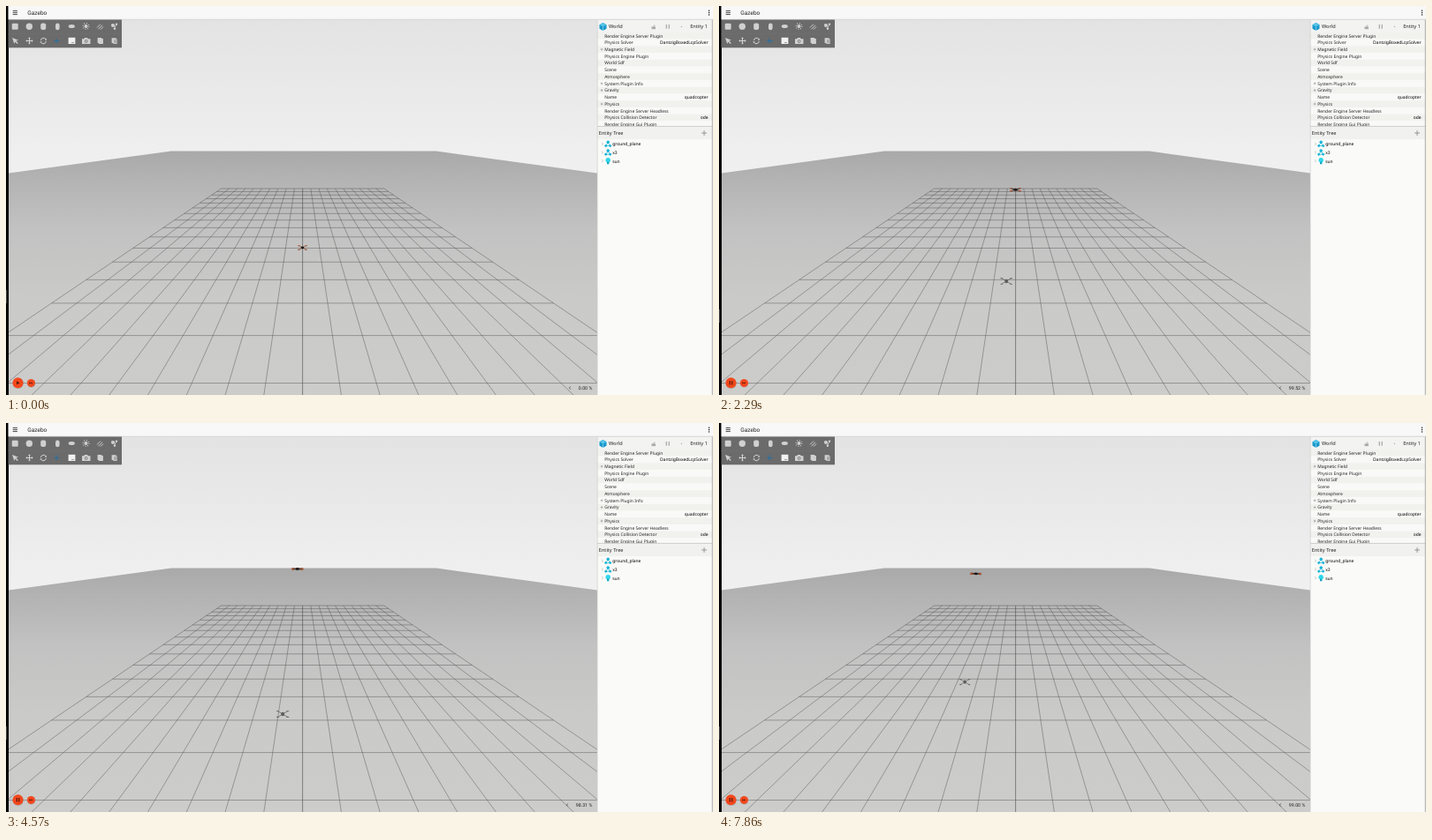
Animation, 800 px wide and 441 px high, one loop 8000 ms. Source, as an HTML page:

```html
<!DOCTYPE html>
<html lang="en">
<head>
<meta charset="utf-8">
<title>Quadcopter simulation</title>
<style>
  html, body { margin: 0; width: 100%; height: 100%; overflow: hidden; background: #000; }
  svg { display: block; width: 100%; height: 100%; }
  text { font-family: "Noto Sans", "Open Sans", sans-serif; font-size: 4.95px; fill: #222; text-rendering: geometricPrecision; }
  .title, .factor { font-family: Roboto, sans-serif; }
  .title { font-size: 6.5px; }
  .factor { font-size: 5.3px; }
  .head { font-size: 5.6px; }
  .value { fill: #000; }
  .end { text-anchor: end; }
</style>
</head>
<body>
<svg viewBox="0 0 800 441" preserveAspectRatio="none">
  <defs>
    <linearGradient id="sky" x1="0" y1="0" x2="0" y2="1">
      <stop offset="0" stop-color="#e3e3e3"/><stop offset=".85" stop-color="#efefef"/><stop offset="1" stop-color="#f0f0f0"/>
    </linearGradient>
    <linearGradient id="ground" gradientUnits="userSpaceOnUse" x1="0" y1="164" x2="0" y2="441">
      <stop offset="0" stop-color="#a9a9a9"/><stop offset=".13" stop-color="#b4b4b4"/>
      <stop offset=".32" stop-color="#c2c2c2"/><stop offset=".6" stop-color="#cacac9"/><stop offset="1" stop-color="#cccccb"/>
    </linearGradient>
    <clipPath id="view"><path d="M3 15H669V441H3z"/></clipPath>
    <clipPath id="list"><path d="M669 30H800V136H669z"/></clipPath>
    <g id="model" fill="#16b5d8" stroke="#16b5d8">
      <path d="M0-1.5L-2.4 2.2H2.4z" fill="none" stroke-width=".7"/>
      <circle cy="-2" r="1.3"/><circle cx="-2.5" cy="2.2" r="1"/><circle cx="2.5" cy="2.2" r="1"/>
    </g>
  </defs>

  <g clip-path="url(#view)">
    <rect x="3" y="15" width="666" height="180" fill="url(#sky)"/>
    <path d="M3 189.5L187 164.5H487L669 189.5V441H3z" fill="url(#ground)"/>
    <path id="grid" fill="none" stroke="#555" stroke-opacity=".72" stroke-width=".65"/>
    <path d="M335.6 207V441" stroke="#444" stroke-opacity=".4" stroke-width=".6"/>
    <g id="shadow"></g>
    <g id="drone"></g>
  </g>

  <rect x="2.5" width="797.5" height="15" fill="#f8f8f8"/>
  <path d="M2.5 15.2H800" stroke="#d0d0d0" stroke-width=".6"/>
  <path d="M7.7 5.6h5.2M7.7 7.6h5.2M7.7 9.6h5.2" stroke="#333" stroke-width=".9"/>
  <text class="title" x="24.3" y="9.8">Gazebo</text>
  <g fill="#222"><circle cx="795.5" cy="5.2" r=".8"/><circle cx="795.5" cy="7.6" r=".8"/><circle cx="795.5" cy="10" r=".8"/></g>
  <rect id="mark" x="0" width="1" height="15" fill="#444"/>

  <rect x="2.5" y="15.5" width="128.5" height="31.8" fill="#6b6b6b"/>
  <path d="M2.5 31.4H131" stroke="#737373" stroke-width=".6"/>
  <g fill="#d0d0d0" stroke="#d8d8d8" stroke-width="0">
    <rect x="6.7" y="19.7" width="7" height="7" rx="1.3"/>
    <circle cx="26.3" cy="23.2" r="3.7"/>
    <rect x="39.2" y="19.6" width="6" height="7.4" rx="2"/>
    <rect x="56" y="19.4" width="4.6" height="7.8" rx="2.3"/>
    <ellipse cx="74.3" cy="23" rx="3.6" ry="2"/>
    <circle cx="90.5" cy="23" r="2"/>
    <circle cx="90.5" cy="23" r="3.4" fill="none" stroke-width="1.2" stroke-dasharray=".9 1.77"/>
    <path d="M103 24.5l4-4M104.5 26.3l4.5-4.5M107 26.6l3-3" stroke-width=".9"/>
    <path d="M119 21l4 1.5M122 26l3-5" stroke-width=".9"/><circle cx="121" cy="22" r="2"/><circle cx="125" cy="20.6" r="1.2"/><circle cx="123" cy="25.8" r="1.2"/>
    <path d="M7 36l7 2.7-2.6.9 2.4 2.5-1 1-2.4-2.6-1 2.4z"/>
    <path d="M23 39.4h7M26.5 36v7" stroke-width="1"/>
    <path d="M22.3 39.4l1.7-1.5v3zM30.7 39.4L29 37.9v3zM26.5 35.3L25 37h3zM26.5 43.5L25 41.8h3z"/>
    <path d="M39.4 39a3.1 3.1 0 0 1 5.6-1.4M45.4 40a3.1 3.1 0 0 1-5.6 1.4" fill="none" stroke-width="1"/>
    <path d="M44 39l2-.2-.4-2.2zM40.6 40l-2 .2.4 2.2z"/>
    <path d="M54.3 39.5h6.5M57 36.8v5.4" stroke="#2c6f9e" stroke-width="1.2"/>
    <rect x="70.6" y="35.8" width="7.8" height="7.2" fill="#f1f1f1"/><path d="M74 41.5h3" stroke="#888" stroke-width=".8"/>
    <path d="M86 37.3h2.2l.8-1.3h3l.8 1.3H95.500v5.800H86z"/><circle cx="90.7" cy="40" r="1.8" fill="#6b6b6b"/><circle cx="90.7" cy="40" r="1"/>
    <path d="M103.600 36h4.600v1h1.700v6h-5v-1h-1.300z"/>
    <path d="M119.600 36.300h5v1.300h1v5.300h-4.200v-1h-1.800z"/><path d="M122 38.200h3v4h-3z" fill="#aaa"/>
  </g>

  <rect x="669" y="15.4" width="131" height="426" fill="#fafaf8"/>
  <rect x="669" y="15.4" width="131" height="14.8" fill="#f3f3f2"/>
  <g id="rows" clip-path="url(#list)"></g>
  <path d="M675.500 19l4 2.200v4.600l-4 2.200-4-2.200v-4.600z" fill="#1999cc"/>
  <path d="M675.500 19l4 2.200-4 2.200-4-2.200z" fill="#58c4e8"/><path d="M675.500 23.400V28" stroke="#d8f2fb" stroke-width=".5"/>
  <text class="head" x="682" y="25.2">World</text>
  <text class="head end" x="793.7" y="25.2">Entity 1</text>
  <g fill="#aaa">
    <path d="M730.5 23.400h4.500v2.800h-4.500z"/><path d="M733 23.400v-1.400h1.500" fill="none" stroke="#aaa" stroke-width=".7"/>
    <path d="M746.600 21h1.300v4.800h-1.300zM749.600 21h1.300v4.800h-1.300z"/><circle cx="764.4" cy="23.4" r=".7"/>
  </g>
  <rect x="669" y="136" width="131" height="15" fill="#f1f1f0"/>
  <path d="M669 136.400H800" stroke="#c4c4c4" stroke-width=".8"/>
  <text class="head" x="670.800" y="146.200">Entity Tree</text>
  <path d="M787 144h6M790 141v6" stroke="#777" stroke-width=".7"/>
  <g id="tree"></g>
  <path d="M669.200 15.500V441" stroke="#c8c8c8" stroke-width=".6"/>
  <path d="M799.300 15.500V441" stroke="#b5b5b5" stroke-width="1.2"/>

  <circle cx="13.700" cy="427.800" r="6.200" fill="#777" opacity=".35"/>
  <circle cx="13.500" cy="427.200" r="6" fill="#f2481d"/>
  <path id="play" d="M12 425.200v4l3.600-2z" fill="#57170a"/>
  <path id="pause" d="M11.700 425h1.200v4.400h-1.200zM14.200 425h1.200v4.400h-1.200z" fill="#57170a"/>
  <circle cx="28.600" cy="427.900" r="4.700" fill="#777" opacity=".35"/>
  <circle cx="28.400" cy="427.400" r="4.500" fill="#f2481d"/>
  <path d="M26.400 426.200v2.400l1.900-1.200zM28.500 426.200v2.400l1.900-1.200z" fill="#57170a"/>
  <text id="factor" class="factor end" x="663.300" y="434.900"></text>
  <path id="chevron" d="M.8-1.600L-.7 0 .8 1.600" fill="none" stroke="#333" stroke-width=".7"/>
</svg>
<script>
const LOOP = 8000, TICKS_PER_MS = 0.007;
const el = id => document.getElementById(id);
const clamp = (v, lo = 0, hi = 1) => Math.min(hi, Math.max(lo, v));

// Ground grid: 20 x 20 cells seen in perspective.
const HORIZON = 144.6, CENTER = 335.6, SPREAD = 0.1477;
const rowY = i => i < 19 ? HORIZON + 1201 / (19.245 - i) : 460;
const gridX = (j, y) => CENTER + (j - 10) * SPREAD * (y - HORIZON);
let grid = "";
for (let i = 0; i <= 20; i++) {
  const y = rowY(i);
  if (y < 441) grid += `M${gridX(0, y)} ${y}H${gridX(20, y)}`;
  grid += `M${gridX(i, rowY(0))} ${rowY(0)}L${gridX(i, 445)} 445`;
}
el("grid").setAttribute("d", grid);

// Property list; a leading + marks an expandable row.
const properties = [
  "Render Engine Server Plugin", "Physics Solver|DantzigBoxedLcpSolver", "+Magnetic Field",
  "Physics Engine Plugin", "World Sdf", "Scene", "Atmosphere", "+System Plugin Info", "+Gravity",
  "Name|quadcopter", "+Physics", "Render Engine Server Headless", "Physics Collision Detector|ode",
  "Render Engine Gui Plugin"
];
el("rows").innerHTML = properties.map((entry, i) => {
  const [label, value = ""] = entry.replace("+", "").split("|");
  const y = 33.7 + i * 7.74;
  const plus = entry[0] === "+" ? `<path d="M672.700 ${y}h2.800M674.100 ${y - 1.4}v2.800" stroke="#777" stroke-width=".5"/>` : "";
  return `<rect x="669" y="${y - 3.87}" width="130" height="7.74" fill="${i % 2 ? "#f9f9f7" : "#f1f1ee"}"/>${plus}
    <text x="677.200" y="${y + 1.8}">${label}</text><text class="value end" x="794.600" y="${y + 1.8}">${value}</text>`;
}).join("");

const bulb = `<circle cy="-1" r="2.700" fill="#2fd6ea"/><path d="M-1.200 1h2.400v2.600h-2.400z" fill="#16a9c4"/>`;
el("tree").innerHTML = ["ground_plane", "x3", "sun"].map((name, i) => {
  const y = 156.3 + i * 9.7;
  return `<path d="M674 ${y - 1.5}l1.600 1.500-1.600 1.500" fill="none" stroke="#999" stroke-width=".5"/>
    <g transform="translate(681.200 ${y})">${i < 2 ? `<use href="#model"/>` : bulb}</g>
    <text class="value" x="686.200" y="${y + 1.8}">${name}</text>`;
}).join("");

// tick, drone x, y, scale, roll, shadow x, y, scale, real time factor
const keys = [
  [8, 335.5, 274, .8, 0, 335.4, 275.5, .5, 99.8],
  [11, 335.8, 262, .8, 0, 333.5, 282, .6, 99.95],
  [21, 334.8, 160.6, 1.08, 0, 317.5, 338.2, 1, 98.95],
  [28, 332.5, 155.2, 1.08, 0, 314, 338.6, .93, 97.87],
  [37, 325, 179.2, .9, 0, 311, 317.5, .78, 99.12],
  [46, 311, 176.9, .9, -5, 298, 305.6, .75, 99.68],
  [55, 290.6, 170.9, .93, 1, 278.2, 293.6, .75, 99]
];

function slope(i, c) {
  if (i === 0) return 0;
  const a = keys[i - 1], b = keys[Math.min(i + 1, keys.length - 1)];
  return (b[c] - a[c]) / (b[0] - a[0]);
}

// Smooth path through the keys.
function stateAt(tick) {
  const last = keys.length - 1;
  const time = clamp(tick, keys[0][0], keys[last][0]);
  let i = 0;
  while (i < last - 1 && time >= keys[i + 1][0]) i++;
  const a = keys[i], b = keys[i + 1], span = b[0] - a[0];
  const u = (time - a[0]) / span, v = 1 - u;
  return a.map((p, c) => p * v * v * (1 + 2 * u) + b[c] * u * u * (3 - 2 * u)
    + span * (slope(i, c) * u * v * v - slope(i + 1, c) * u * u * v));
}

const corners = [[-1, -1], [1, -1], [-1, 1], [1, 1]];
function copter(w, h, bodyH, arm, rotor, body) {
  return corners.map(([sx, sy]) => `<path d="M0 0L${sx * w} ${sy * h}" stroke="${arm}" stroke-width=".9"/>
    <ellipse cx="${sx * w}" cy="${sy * h}" rx="1.900" ry=".7" fill="${rotor}"/>`).join("")
    + `<ellipse rx="2.300" ry="${bodyH}" fill="${body}"/>`;
}
const place = (x, y, s, r = 0) => `translate(${x} ${y}) rotate(${r}) scale(${s})`;

function draw(tick) {
  const [, x, y, size, roll, shadowX, shadowY, shadowSize, rate] = stateAt(tick);
  const open = clamp((y - 150) / 120);
  const rotor = y < 158 ? "#2a2422" : "#a8502f";
  el("drone").innerHTML = copter(5.2, .25 + 2.6 * open, 1.4 + .4 * open, open > .5 ? "#8e5038" : "#2c2320", rotor, "#251a17");
  el("drone").setAttribute("transform", place(x, y, size, roll));
  el("shadow").innerHTML = copter(6.6, 4, 2.7, "#5c5c5c", "#686868", "#555");
  el("shadow").setAttribute("transform", place(shadowX, shadowY, shadowSize));
  el("shadow").setAttribute("opacity", clamp((tick - 8) / 2) * .92);

  const running = tick >= 2;
  el("play").setAttribute("visibility", running ? "hidden" : "visible");
  el("pause").setAttribute("visibility", running ? "visible" : "hidden");
  const measured = tick >= 6;
  el("factor").textContent = (measured ? rate : 0).toFixed(2) + " %";
  el("chevron").setAttribute("transform", `translate(${measured ? 635 : 638} 433)`);
  el("mark").setAttribute("y", measured ? 344 : 322);
}

let shown = -1;
const start = performance.now();
function frame() {
  const t = (performance.now() - start) % LOOP;
  const tick = Math.floor(t * TICKS_PER_MS + .05);
  if (tick !== shown) draw(shown = tick);
  requestAnimationFrame(frame);
}
frame();
</script>
</body>
</html>
```
